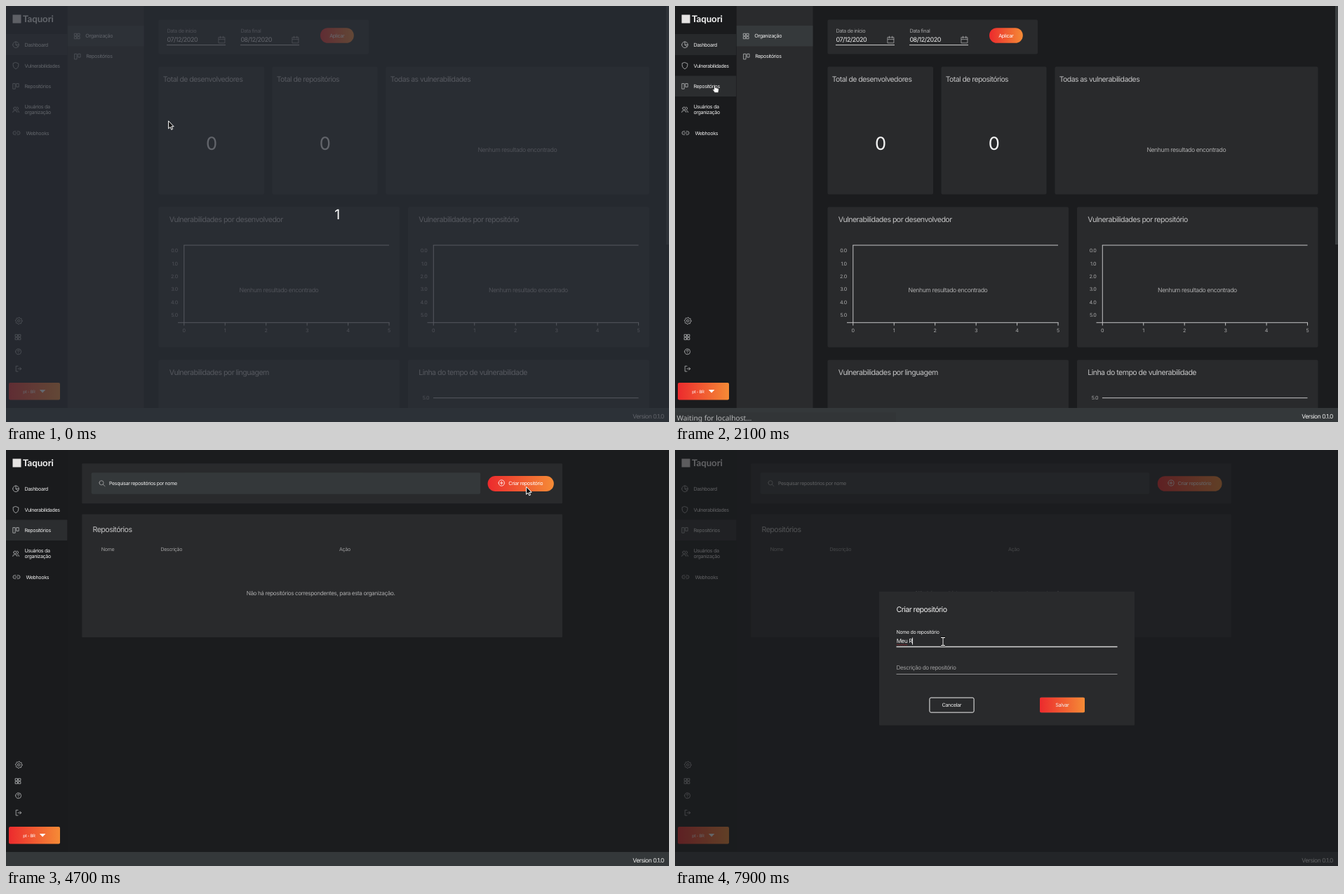
Write an HTML page that moves like this. It is 945 px wide and 593 px high and loops after 8 s.

```html
<!DOCTYPE html>
<html lang="pt-BR">
<head>
<meta charset="utf-8">
<title>Painel</title>
<style>
html, body { margin: 0; width: 100%; height: 100%; overflow: hidden; background: #1b1c1e; }
svg { display: block; width: 945px; height: 593px; }
text { font-family: Inter, "Noto Sans", sans-serif; letter-spacing: -.052em; white-space: pre; text-rendering: geometricPrecision; }
.brand { font-family: Lato, sans-serif; font-weight: 700; letter-spacing: 0; }
.status { font-family: "Noto Sans", sans-serif; letter-spacing: 0; }
</style>
</head>
<body>
<svg id="stage" viewBox="0 0 945 593" xmlns="http://www.w3.org/2000/svg">
  <defs>
    <linearGradient id="warm"><stop stop-color="#ec2a2d"/><stop offset="1" stop-color="#f58b36"/></linearGradient>
  </defs>
</svg>
<script>
const LOOP = 8000, STEP = 50;
const stage = document.getElementById('stage');

function add(parent, tag, attrs, content) {
  const el = document.createElementNS('http://www.w3.org/2000/svg', tag);
  set(el, attrs);
  if (content !== undefined) el.textContent = content;
  parent.appendChild(el);
  return el;
}
function set(el, attrs) {
  for (const key in attrs) el.setAttribute(key, attrs[key]);
}
const group = (parent, attrs = {}) => add(parent, 'g', attrs);
const box = (parent, x, y, width, height, fill, rx = 0) =>
  add(parent, 'rect', { x, y, width, height, fill, rx });
// y is the middle of the capitals
const label = (parent, x, y, size, fill, content, extra = {}) =>
  add(parent, 'text', { x, y: y + size * .364, 'font-size': size, fill, ...extra }, content);
const stroke = (parent, d, color = '#b9babb', width = .8) =>
  add(parent, 'path', { d, fill: 'none', stroke: color, 'stroke-width': width, 'stroke-linejoin': 'round', 'stroke-linecap': 'round' });
const rule = (parent, x1, y1, x2, y2, color = '#c4c4c5', width = 1) =>
  add(parent, 'path', { d: `M${x1} ${y1}L${x2} ${y2}`, stroke: color, 'stroke-width': width });
const circle = (cx, cy, r) => `M${cx - r} ${cy}a${r} ${r} 0 1 0 ${2 * r} 0a${r} ${r} 0 1 0 ${-2 * r} 0`;
const square = (x, y, w, h = w) => `M${x} ${y}h${w}v${h}h${-w}z`;
const grid = (x, y) => [0, 4.4].map(i => [0, 4.4].map(j => square(x + i, y + j, 3)).join('')).join('');
const columns = (x, y) => square(x, y, 3, 7.6) + square(x + 5, y, 3, 4.8);
const MID = { 'text-anchor': 'middle' }, END = { 'text-anchor': 'end' };
const CARD = '#292a2c', SOFT = '#c3c3c4', PALE = '#efefef', DIM = '#a9a9aa';

const page = group(stage);
box(page, 0, 0, 945, 593, '#1b1c1e');

// Dashboard
const dash = group(page);
box(dash, 87.5, 0, 109, 573, '#2a2b2d');
box(dash, 87.5, 28, 109, 29.5, '#35393b');
stroke(dash, grid(97.7, 39.3));
stroke(dash, columns(98, 68.3));
label(dash, 113.3, 42.7, 7.2, PALE, 'Organização');
label(dash, 114.2, 71.7, 7.15, PALE, 'Repositórios');
box(dash, 941, 0, 4, 340, '#3a3d3f');

box(dash, 217.5, 19.5, 299.5, 49, CARD, 2);
[[229, 'Data de início', '07/12/2020'], [334, 'Data final', '08/12/2020']].forEach(([x, name, date]) => {
  label(dash, x + .4, 35.3, 7.35, '#a4a4a5', name);
  label(dash, x + .4, 48.2, 9, PALE, date);
  rule(dash, x, 55.6, x + 84, 55.6, '#d0d0d0');
  stroke(dash, square(x + 74.3, 44.6, 8.6, 8.2) + `M${x + 74.3} 47.4h8.6M${x + 76.5} 43.2v2.4M${x + 80.7} 43.2v2.4`, '#a8a8a9');
});
box(dash, 448, 31.2, 47.8, 21.6, 'url(#warm)', 10.8);
label(dash, 471.8, 42, 7.2, '#fff', 'Aplicar', MID);

[[217.5, 150.5, 'Total de desenvolvedores'], [379.5, 150, 'Total de repositórios'], [541.5, 375, 'Todas as vulnerabilidades']]
  .forEach(([x, w, title], i) => {
    box(dash, x, 86.5, w, 182, CARD, 2);
    label(dash, x + 6.2, 104, 10.45, SOFT, title);
    if (i < 2) label(dash, x + w / 2 - .3, 195.8, 25.5, '#f4f4f4', '0', MID);
    else label(dash, x + w / 2 - .2, 205, 8.7, DIM, 'Nenhum resultado encontrado', MID);
  });

[[217.5, 'Vulnerabilidades por desenvolvedor', 'Vulnerabilidades por linguagem'],
 [573, 'Vulnerabilidades por repositório', 'Linha do tempo de vulnerabilidade']].forEach(([x, top, bottom]) => {
  const left = x + 36.3, right = x + 328.5;
  box(dash, x, 286.5, 343.5, 200, CARD, 2);
  box(dash, x, 504.5, 343.5, 90, CARD, 2);
  label(dash, x + 15.2, 304, 10.63, SOFT, top);
  label(dash, x + 15.2, 522, 10.63, SOFT, bottom);
  rule(dash, left - .5, 341, right, 341);
  rule(dash, left, 341, left, 455.5);
  rule(dash, x + 27.5, 451.3, right + .5, 451.3);
  for (let i = 0; i < 6; i++) {
    const tick = left + i * 58.45;
    if (i) rule(dash, tick, 451, tick, 455.5);
    label(dash, tick - .2, 462, 7.2, DIM, i, MID);
    label(dash, x + 27.3, 348.5 + i * 18.4, 7.2, DIM, i + '.0', END);
  }
  label(dash, x + 171.5, 405, 8.7, DIM, 'Nenhum resultado encontrado', MID);
});
label(dash, 603.2, 558, 7.2, DIM, '5.0', END);
rule(dash, 609, 558.7, 901.5, 558.7);

// Repositories
const repos = group(page);
box(repos, 108.3, 19.3, 684.7, 57, CARD, 1);
box(repos, 121.7, 32.3, 554.5, 30.5, '#34383a', 2);
stroke(repos, circle(136, 46.8, 3.1) + 'M138.4 49.2l2.6 2.4', '#a8a8a9');
label(repos, 147, 47.5, 7.05, PALE, 'Pesquisar repositórios por nome');
const create = group(repos);
box(create, 687.8, 37.2, 91.8, 21.6, 'url(#warm)', 10.8);
stroke(create, circle(707, 47, 4.1) + 'M705 47h4M707 45v4', '#fff');
label(create, 716.8, 47.7, 7.05, '#fff', 'Criar repositório');
const panel = box(repos, 108.3, 91.5, 684.7, 175.5, CARD, 1);
const table = group(repos);
label(table, 123.5, 113, 10.7, SOFT, 'Repositórios');
[[135.8, 'Nome'], [220.5, 'Descrição'], [475, 'Ação']].forEach(([x, s]) => label(table, x, 141.7, 7.1, '#a0a0a1', s));
label(table, 448.5, 203.8, 8.2, DIM, 'Não há repositórios correspondentes, para esta organização.', MID);
const loader = group(repos);
const rings = ['#525254', '#606062'].map(color =>
  add(loader, 'circle', { cx: 450.5, cy: 194.5, fill: 'none', stroke: color, 'stroke-width': 9.8 }));

// Sidebar and footer
box(page, 0, 0, 87.5, 573, '#1a1b1d');
const dashRow = box(page, 0, 40, 87.3, 30, '#27292b');
const repoRow = box(page, 0, 99.5, 87.3, 29.5, '#2b2d2f');
box(page, 9.5, 12.5, 12, 12, '#e6e4e3');
label(page, 24, 18.6, 13.2, '#f6f6f6', 'Taquori', { class: 'brand' });
[[26.4, 55.3, 'Dashboard'], [26.4, 85, 'Vulnerabilidades'], [26.4, 114, 'Repositórios'],
 [26.4, 143.6, 'Usuários da'], [26.4, 151.8, 'organização'], [28.4, 181, 'Webhooks']]
  .forEach(([x, y, s]) => label(page, x, y, 7.15, PALE, s));
stroke(page, circle(14, 55.3, 4.3) + 'M14 51v4.3h4.3M14 55.3l3 3');
stroke(page, 'M14 80.6l3.8 1.4v3q0 3-3.8 4.8q-3.8-1.8-3.8-4.8v-3z');
stroke(page, columns(10.2, 110.6));
stroke(page, circle(12.8, 146, 2) + 'M9.6 151.5q0-2.6 3.2-2.6t3.2 2.6M15.8 144q1.8.3 1.8 2t-1.8 2M16.8 149q1.8.5 1.8 2.5');
stroke(page, 'M13.8 178.6h-1.4a2.4 2.4 0 0 0 0 4.8h1.4M16.2 178.6h1.4a2.4 2.4 0 0 1 0 4.8h-1.4M12.8 181h4.4');
let gear = '';
for (let i = 0; i < 32; i++) {
  const r = i % 4 < 2 ? 4.9 : 3.9, a = i * Math.PI / 16;
  gear += (i ? 'L' : 'M') + (18.3 + r * Math.cos(a)).toFixed(2) + ' ' + (448.8 + r * Math.sin(a)).toFixed(2);
}
stroke(page, gear + 'z' + circle(18.3, 448.8, 1.7));
stroke(page, grid(13.5, 468.3));
stroke(page, circle(17.6, 492.7, 4) + 'M16.3 491.8q0-1.4 1.3-1.4t1.3 1.2q0 .9-1.3 1.5M17.6 494.8v.1');
stroke(page, 'M17 513.3h-2.8v7.6h2.8M17 517.1h4.6M19.8 515.2l1.9 1.9l-1.9 1.9');
box(page, 4, 537, 73, 24.5, 'url(#warm)', 2);
label(page, 24.3, 549.8, 6, '#fff', 'pt - BR');
add(page, 'path', { d: 'M47.8 547h8.6l-4.3 4.6z', fill: '#fff' });
box(page, 0, 573, 945, 20, '#34383a');
label(page, 938, 584.8, 8.5, PALE, 'Version 0.1.0', END);
const status = group(page);
box(status, 0, 579.5, 315, 13.5, '#323537');
label(status, 2.5, 587.6, 10.2, '#b8b9ba', 'Waiting for localhost…', { class: 'status' });

// Countdown
const count = group(stage);
box(count, 0, 0, 945, 593, '#2a2f37').setAttribute('opacity', .72);
label(count, 471.8, 297, 19.5, '#fff', '1', MID);

// Dialog
const dialog = group(stage);
box(dialog, 0, 0, 945, 593, '#1b1d1f').setAttribute('opacity', .68);
box(dialog, 291, 201.7, 364, 190.8, CARD, 1);
label(dialog, 315.5, 226.8, 10.65, PALE, 'Criar repositório');
const nameLabel = label(dialog, 315.5, 271, 8.2, '#999', 'Nome do repositório');
label(dialog, 315.5, 310.2, 8.2, '#9b9b9c', 'Descrição do repositório');
const nameLine = rule(dialog, 315.5, 280.5, 630.5, 280.5, '#8e8e8f');
rule(dialog, 315.5, 319.5, 630.5, 319.5, '#8e8e8f');
add(dialog, 'rect', { x: 362.9, y: 353.1, width: 63.2, height: 21, rx: 2, fill: 'none', stroke: '#f0f0f0' });
label(dialog, 394.3, 363.2, 7.3, PALE, 'Cancelar', MID);
box(dialog, 520, 352.8, 64, 21.5, '#5f6062', 2);
const save = box(dialog, 520, 352.8, 64, 21.5, 'url(#warm)', 2);
label(dialog, 551.8, 363.2, 7.3, PALE, 'Salvar', MID);
const typed = label(dialog, 315.7, 272.4, 8.15, PALE, '');
const squiggle = stroke(dialog, 'M316 277.6' + 'q.75-1 1.5 0t1.5 0'.repeat(5), '#a3292e', .7);
const caret = box(dialog, 316, 267.5, .9, 10, '#fff');

// Pointers, drawn from their top left corner
const cursor = group(stage);
const shapes = {
  arrow: add(cursor, 'path', { d: 'M.6.8v11l2.5-2.3l1.7 3.8l1.8-.8l-1.7-3.7h3.3z', fill: '#111', stroke: '#fff', 'stroke-width': 1 }),
  hand: add(cursor, 'path', { d: 'M2.6 1q1-.8 1.7.3v3.2l4 .9q1.2.4 1.1 1.8l-.7 4.3h-5L.7 7.4q0-1.3 1.9-.2z', fill: '#fff', stroke: '#222', 'stroke-width': .6 }),
  beam: group(cursor)
};
stroke(shapes.beam, 'M-2.6-5.5h5.2M0-5.5v11M-2.6 5.5h5.2', '#111', 2.4);
stroke(shapes.beam, 'M-2.6-5.5h5.2M0-5.5v11M-2.6 5.5h5.2', '#fff', 1);

// time, x, y, shape
const moves = [
  [0, 231, 163, 'arrow'], [900, 231, 162],
  [1100, 222, 159], [1200, 170, 143], [1300, 105, 127], [1400, 72.5, 120, 'hand'],
  [1550, 70, 119.5], [1600, 57, 116], [1650, 42, 112.5], [1750, 38, 111.5], [1850, 53, 112],
  [2900, 55, 113], [3000, 62, 116], [3050, 70, 119], [3100, 75, 121, 'arrow'],
  [3250, 110, 129], [3300, 190, 147], [3350, 290, 170], [3450, 400, 194], [3500, 446, 202],
  [3650, 452, 199], [3750, 500, 179], [3850, 570, 144], [3950, 640, 106], [4050, 702, 74], [4150, 746, 55], [4250, 762, 51],
  [4700, 741, 51.5],
  [5350, 722, 62], [5400, 670, 95], [5450, 600, 140], [5500, 525, 190], [5600, 440, 240], [5700, 404, 259], [5750, 396, 262.5],
  [5800, 395, 263.5], [5850, 392, 266], [5900, 387, 269], [5950, 382, 273, 'beam']
];
const typing = [[0, ''], [7200, 'M'], [7300, 'Me'], [7450, 'Meu'], [7500, 'Meu '], [7900, 'Meu R']];
const last = (rows, t) => rows.filter(row => row[0] <= t).pop();
const ramp = (t, from, to) => Math.min(1, Math.max(0, (t - from) / (to - from)));
const show = (el, on) => set(el, { visibility: on ? 'visible' : 'hidden' });
const mix = (a, b, k) => a + (b - a) * k;
const grey = v => `rgb(${v},${v},${v})`;

function draw(t) {
  show(count, t < 50);
  show(dash, t < 2400);
  show(repos, t >= 2400);
  show(status, t >= 2100 && t < 2400);
  set(dashRow, { opacity: 1 - ramp(t, 2400, 2750) });
  set(repoRow, { opacity: ramp(t, 1350, 1700) });

  const loading = t >= 2400 && t < 2750;
  show(loader, loading);
  show(table, t >= 2750);
  set(panel, { height: loading ? 190.5 : 175.5 });
  rings.forEach((ring, i) => {
    const r = (i ? 9 : 34) + (t - 2600) * .07;
    set(ring, { r: Math.max(0, r), opacity: r > 0 ? 1 : 0 });
  });
  const grow = 1 + .027 * ramp(t, 4050, 4250) * (t < 5050);
  set(create, { transform: `translate(733.8 48) scale(${grow}) translate(-733.8 -48)` });

  set(dialog, { opacity: ramp(t, 4950, 5250) });
  const lift = ramp(t, 6050, 6300), focus = t >= 6100;
  set(nameLabel, { y: mix(274, 261.5, lift), 'font-size': mix(8.2, 7.06, lift), fill: grey(Math.round(mix(155, 239, lift))) });
  set(nameLine, { stroke: focus ? '#d4d4d4' : '#8e8e8f', 'stroke-width': focus ? 1.4 : 1 });
  const words = last(typing, t)[1];
  typed.textContent = words;
  set(save, { opacity: ramp(t, 7150, 7300) });
  show(squiggle, t >= 7500);
  show(caret, t >= 6300 && !(t >= 6800 && t < 7200));
  set(caret, { x: words ? 315.7 + typed.getComputedTextLength() : 315.9 });

  const [, x, y] = last(moves, t);
  const shape = last(moves.filter(row => row[3]), t)[3];
  set(cursor, { transform: `translate(${x} ${y})` });
  for (const name in shapes) set(shapes[name], { display: name === shape ? 'inline' : 'none' });
}

const start = performance.now();
function tick() {
  const t = (performance.now() - start) % LOOP;
  draw(Math.floor(t / STEP) * STEP);
  requestAnimationFrame(tick);
}
tick();
</script>
</body>
</html>
```
